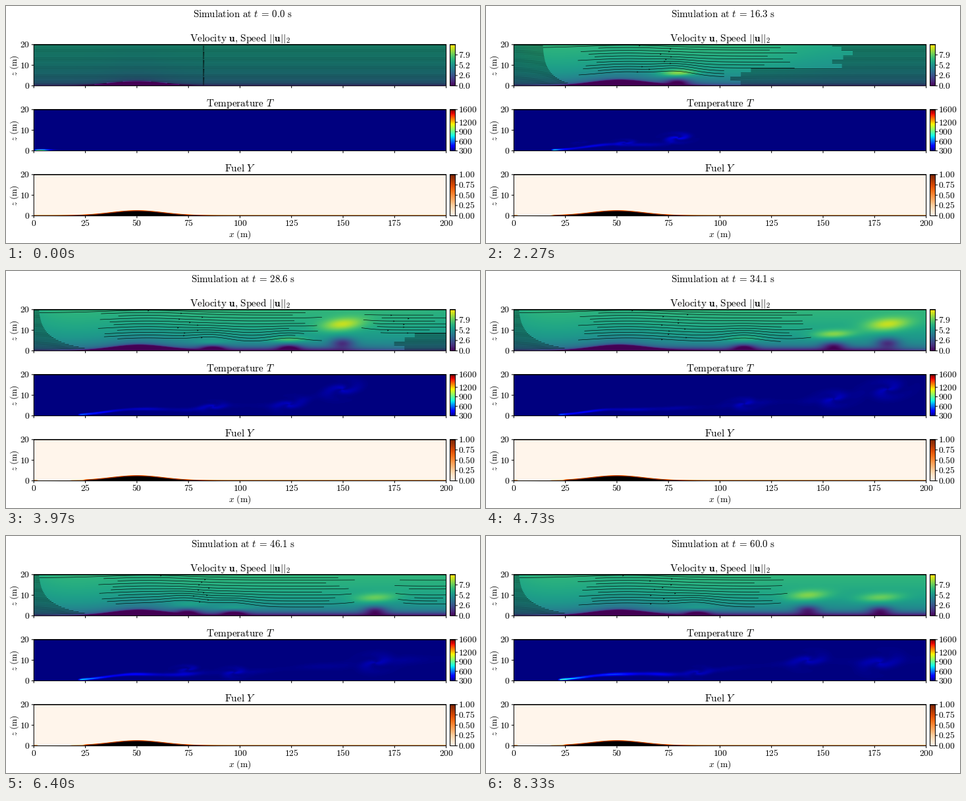
Recreate the animation shown at these times as a matplotlib script. Size 720 by 361 pixels, loop 8.37 s.

```python
import numpy as np
import matplotlib as mpl
import matplotlib.pyplot as plt
from matplotlib.animation import FuncAnimation
from matplotlib.collections import LineCollection

W, H, DPI = 720, 361, 100
INTERVAL, LOOP_MS = 30, 8370
STEPS, T_END = 250, 60.0
LEFT, RIGHT, TOP, BOTTOM, PITCH = 42.3, 668.6, 58.8, 121.6, 99
BAR = (674.5, 682.5)
SMALL, LARGE = 9.8, 11
mpl.rcParams["mathtext.fontset"] = "cm"

fig = plt.figure(figsize=(W / DPI, H / DPI), dpi=DPI, facecolor="white")
ax = fig.add_axes([0, 0, 1, 1])
ax.axis("off")


def px(x):
    return LEFT + np.asarray(x) / 200 * (RIGHT - LEFT)


def py(z, panel=0):
    return BOTTOM + PITCH * panel - np.asarray(z) / 20 * (BOTTOM - TOP)


def sig(a):
    return 0.5 * (1 + np.tanh(a / 2))


def hill(x):
    return 2.35 * np.exp(-(((x - 50) / 18) ** 2))


# ---------- plume model ----------
x = np.linspace(0, 200, 314)[None, :]
z = np.linspace(0, 20, 64)[:, None]

# time, x, z, speed, climb and growth length of each puff
PUFFS = [
    (28.6, 150, 13.0, 5.75, 0.095, 30),
    (28.6, 124, 5.5, 5.7, 0.086, 130),
    (28.6, 87, 4.5, 4.5, 0.055, 180),
    (52.1, 132, 5.5, 5.8, 0.075, 200),
    (52.1, 104, 7.5, 4.9, 0.065, 130),
    (60.0, 89, 4.0, 4.5, 0.06, 200),
]


def puffs_at(t):
    """Position, height, gust strength and initial heat of every puff."""
    out = []
    for t0, x0, z0, v, climb, length in PUFFS:
        xp = x0 + v * (t - t0)
        zp = np.clip(z0 + climb * (xp - x0), 4, 13)
        out.append((xp, zp, np.clip((xp - 45) / length, 0, 1), 180 * 30 / length))
    return out


def visible(puffs):
    return [p for p in puffs if 25 < p[0] < 235]


def speed(t, puffs):
    ramp, lead = min(1, t / 4), puffs[0][0]
    ground = 0.9 * hill(x) + 0.8 * ramp * np.exp(-(((x - 57) / 24) ** 2))
    h = np.clip(z - ground, 0, None)
    u = 6.1 * (h / 20) ** 0.2
    u += 0.75 * ramp * sig((x - 2) / 5) * sig((lead + 60 - x) / 10) * (1 - np.exp(-h / 3))
    u -= 2 * ramp * sig((x - 72) / 5) * sig((lead + 5 - x) / 6) * np.exp(-((z / 2) ** 2))
    for xp, zp, grow, _ in visible(puffs):
        wide, tall = 7 + 0.02 * xp, 1 + 0.27 * max(zp - 4, 0)
        dx = (x - xp - 0.9 * (z - zp)) / wide
        u += 3.2 * grow * np.exp(-dx ** 2 - ((z - zp) / tall) ** 2)
        low = np.clip((xp - 45) / 30, 0, 1)
        u -= 3.5 * low * np.exp(-(((x - xp) / 6) ** 2)
                                - ((z - 0.3 * zp) / (0.9 + 0.14 * zp)) ** 2)
    return np.clip(u, 0, None) * (1 - np.exp(-h / 0.25))


def temperature(t, puffs):
    start = np.interp(t, [0, 9.8, 16, 28], [0, 16, 18, 21.5])
    lead = max(puffs[0][0], start + 8)
    wave = np.sin((x - 4.5 * t) / 7)
    mid = (hill(np.minimum(x, 50)) + 0.25 + 0.6 * np.clip((x - 18) / 20, 0, 1)
           + 0.3 * wave * np.clip((x - 40) / 30, 0, 1))
    knots = sorted((p[0], p[1]) for p in puffs if p[0] > 76)
    kx, kz = zip((75, 3.2), *knots)
    mid = np.where(x > 75, np.interp(x, kx, kz) + 0.3 * wave, mid)

    s = np.clip(x - start, 0, None)
    late = sig((t - 46) / 2)
    flicker = 0.75 + 0.25 * np.sin(2.3 * t)
    heat = 900 * flicker * np.exp(-s / 2.5) * (1 - np.exp(-s))
    heat = heat + (250 + 250 * late) * np.exp(-s / (30 + 10 * late)) * (1 - np.exp(-s / 0.7))
    heat = heat + 350 * np.exp(-t) * np.exp(-(((x - 4) / 3.5) ** 2))
    heat = heat * (0.8 + 0.2 * np.sin((x - 5 * t) / 3.7)) * sig((80 - x) / 5)
    tail = 24 * sig((x - 70) / 4) * (0.65 + 0.35 * np.sin((x - 5.3 * t) / 6))
    width = 0.36 + 0.011 * s
    field = (heat + tail) * sig((lead - x) / 2) * np.exp(-(((z - mid) / width) ** 2))

    for xp, zp, _, hot in visible(puffs):
        a = (x - xp - 0.5 * (z - zp)) / (3.5 + 0.035 * xp)
        b = (z - zp) / (1 + 0.03 * max(xp - 40, 0))
        r2 = a * a + b * b
        swirl = 0.6 + 0.4 * np.sin(2 * np.arctan2(b, a) - 4 * np.sqrt(r2) + 0.6 * t)
        amp = (50 + hot * np.exp(-(xp - 40) / 50)) * np.clip((xp - 28) / 12, 0, 1)
        field = field + amp * swirl * np.exp(-r2)
    return 300 + field


fx = np.linspace(0, 200, 626)[None, :]
fz = (np.arange(63)[:, None] + 0.5) * 20 / 63
band = np.clip((hill(fx) + 0.45 - fz) * 3.15 + 0.5, 0, 1)


def fuel(t):
    burnt = 2 + 16 * min(1, t / 8)
    left = 1 - sig((fx - 1.8) * 6) * sig((burnt - fx) * 6) * min(1, t)
    edge = 18 + 6.5 * np.clip((t - 14) / 14, 0, 1)
    left = left * (1 - 0.65 * sig((fx - 17.8) * 6) * sig((edge - fx) * 3) * min(1, t / 9))
    return band * left


# ---------- streamlines ----------
ROWS = np.linspace(0, 20, 30)[1:-1]
SPARSE = np.arange(4.3, 17.8, 1.45)


def lift(xs, level, t, puffs):
    """Rise of a streamline over the hill and the puffs."""
    rise = 2.2 * np.exp(-(((xs - 55) / 28) ** 2)) * (1 - level / 40)
    for xp, zp, *_ in visible(puffs):
        grow = 1.9 * np.clip((xp - 45) / 30, 0, 1)
        rise += grow * np.exp(-(((xs - xp) / 12) ** 2) - ((level - 0.8 * zp) / 6) ** 2)
    return min(1, t / 1.5) * rise


def streamlines(t, puffs):
    lines, heads = [], []
    lead = puffs[0][0]
    near = np.interp(t, [9.8, 17, 26], [12, 14, 2])

    def add(level, a, b, arrow=True):
        a, b = max(a, 0), min(b, 200)
        if b - a < 1:
            return
        xs = np.linspace(a, b, int((b - a) / 2) + 3)
        zs = level + lift(xs, level, t, puffs)
        zs[(zs > 20) | (zs < hill(xs))] = np.nan
        pts = np.column_stack((px(xs), py(zs)))
        lines.append(pts)
        if arrow and b - a > 30:
            heads.append(pts[int(0.41 * len(pts))])

    def inflow(level):
        return near + (28 - near) * np.exp(-level / 5) + 200 * np.exp(-1.5 * t)

    def calm(level):
        return max(110, lead + 30 + 50 * (level > 8.5))

    # dense straight lines at the inlet and ahead of the plume
    for k, level in enumerate(ROWS):
        step = 5 * np.sin(4.7 * (k // 3))
        add(level, 0, inflow(level))
        add(level, max(calm(level) + step, inflow(level)), 200, arrow=False)

    # sparse curved lines, broken at the strong puffs
    breaks = sorted(p[0] for p in puffs if 95 < p[0] < 215 and p[1] > 6)
    starts = [36] + [b + 14 for b in breaks]
    ends = [b - 18 for b in breaks] + [200 if breaks else min(lead + 50, 186)]
    for k, level in enumerate(SPARSE):
        for a, b in zip(starts, ends):
            a = max(a, inflow(level) + 12) + 5 * np.sin(2.4 * k + 0.7 * t)
            b = min(b + 8 * np.sin(3.9 * k + 0.5 * t), calm(level) - 8)
            if b - a > 12:
                add(level, a, b)
    add(18.5, inflow(18.5), ends[0])
    return lines, np.array(heads)


# ---------- static parts ----------
def rm(s):
    return r"\mathrm{" + s.replace(" ", r"\ ") + "}"


def put(xp, yp, s, size=SMALL, ha="center", va="baseline", **kw):
    return ax.text(xp, yp, f"${s}$", fontsize=size, ha=ha, va=va, **kw)


def picture(data, x0, x1, panel, cmap, lo, hi):
    box = (x0, x1, BOTTOM + PITCH * panel, TOP + PITCH * panel)
    return ax.imshow(data, extent=box, origin="lower", aspect="auto", cmap=cmap,
                     vmin=lo, vmax=hi, interpolation="bilinear", zorder=1)


PANELS = [
    (rm("Velocity") + r"\ \mathbf{u}{,}\ " + rm("Speed") + r"\ ||\mathbf{u}||_2",
     "viridis", 0, 10.45, [0, 2.62, 5.24, 7.86], "{:.1f}"),
    (rm("Temperature") + r"\ T", "jet", 300, 1600, [300, 600, 900, 1200, 1600], "{:.0f}"),
    (rm("Fuel") + r"\ Y", "Oranges", 0, 1, [0, 0.25, 0.5, 0.75, 1], "{:.2f}"),
]

images, strokes = [], []
for n, (title, cmap, lo, hi, ticks, fmt) in enumerate(PANELS):
    top, bottom = TOP + PITCH * n, BOTTOM + PITCH * n
    blank = np.zeros((63, 626) if n == 2 else (64, 314))
    images.append(picture(blank, LEFT, RIGHT, n, cmap, lo, hi))
    picture(np.linspace(lo, hi, 256)[:, None], *BAR, n, cmap, lo, hi)
    put((LEFT + RIGHT) / 2, top - 4.5, title, LARGE)
    for a, b in ((LEFT, RIGHT), BAR):
        strokes.append([(a, top), (b, top), (b, bottom), (a, bottom), (a, top), (b, top)])
    for v in range(0, 201, 25):
        strokes.append([(px(v), bottom), (px(v), bottom + 3.5)])
        if n == 2:
            put(px(v), 335, v)
    for v in (0, 10, 20):
        y = py(v, n)
        strokes.append([(LEFT - 3.5, y), (LEFT, y)])
        put(36.5, y + 4.5, v, ha="right")
    for v in ticks:
        y = bottom - (v - lo) / (hi - lo) * (bottom - top)
        strokes.append([(BAR[1], y), (BAR[1] + 3.5, y)])
        put(687, y + 4.5, fmt.format(v), ha="left")
    put(13.5, (top + bottom) / 2, r"z\ " + rm("(m)"), va="center", rotation=90)
put((LEFT + RIGHT) / 2, 351.5, r"x\ " + rm("(m)"))

sx = np.linspace(0, 200, 201)
ax.fill_between(px(sx), py(0, 2), py(hill(sx), 2), color="black", lw=0, zorder=2)
ax.add_collection(LineCollection(strokes, colors="black", linewidths=0.75,
                                 zorder=5, snap=False))
flow = LineCollection([], colors="black", linewidths=0.45, zorder=3, snap=False)
ax.add_collection(flow)
arrows, = ax.plot([], [], ">", color="black", ms=1.5, mew=0, zorder=3)
clock = put(359.5, 17, "t", 10.8)
ax.set_xlim(0, W)
ax.set_ylim(H, 0)


def update(i):
    # the simulation advances 30 steps per second
    step = min(STEPS, int((i * INTERVAL + 25) * 0.03))
    t = T_END * step / STEPS
    puffs = puffs_at(t)
    images[0].set_data(speed(t, puffs))
    images[1].set_data(temperature(t, puffs))
    images[2].set_data(fuel(t))
    lines, heads = streamlines(t, puffs)
    flow.set_segments(lines)
    arrows.set_data(heads[:, 0], heads[:, 1])
    clock.set_text("$" + rm("Simulation at ") + rf"t\,=\,{t:.1f}" + rm(" s") + "$")
    return [*images, flow, arrows, clock]


anim = FuncAnimation(fig, update, frames=LOOP_MS // INTERVAL, interval=INTERVAL,
                     repeat=True, repeat_delay=0, blit=False)
plt.show()
```
